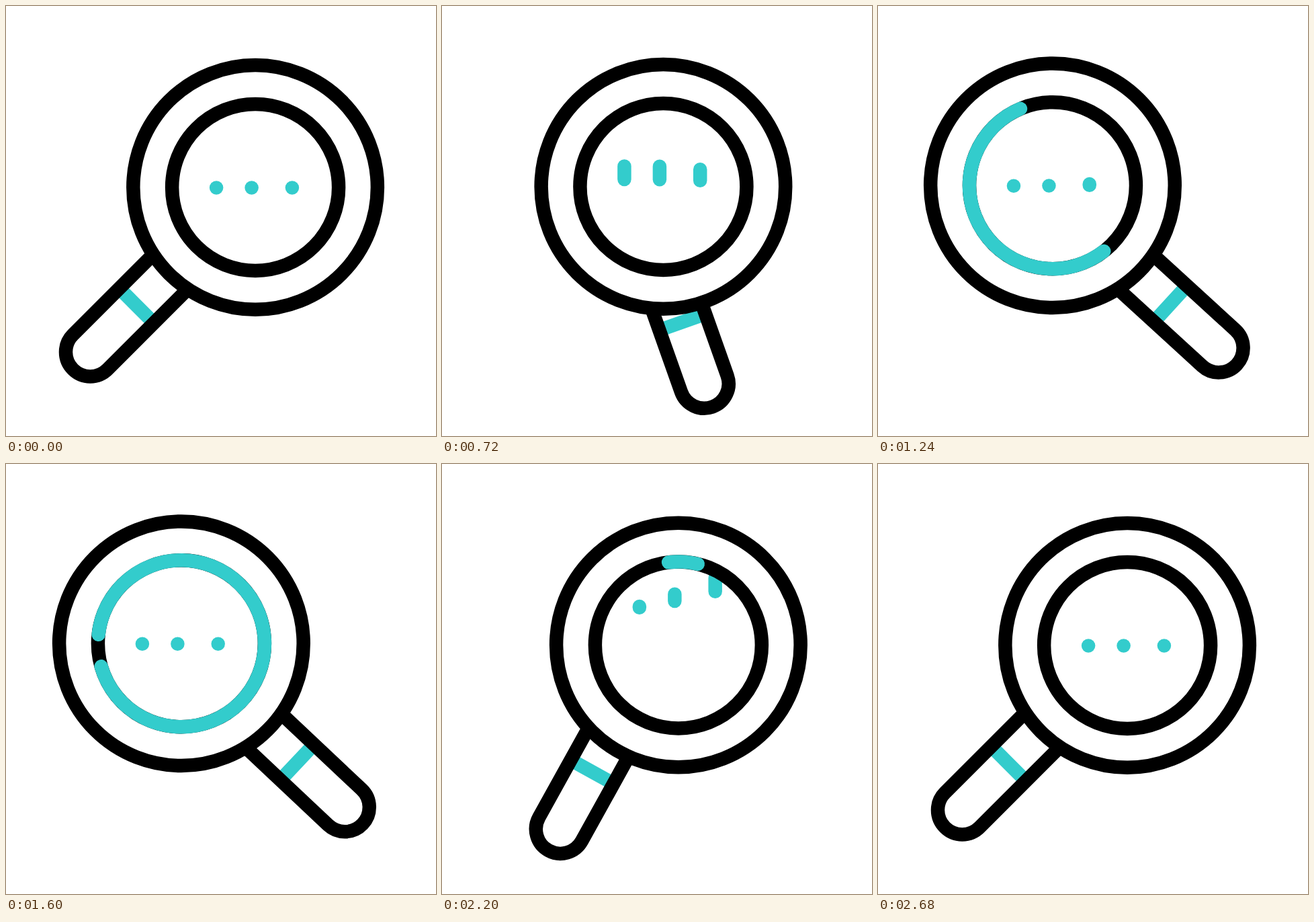
These frames come from a looping animation (640x640 px, 3000 ms). An HTML page:

```html
<!DOCTYPE html>
<html lang="en">
<head>
<meta charset="utf-8">
<title>Magnifier</title>
<style>
  html, body { margin: 0; width: 100%; height: 100%; overflow: hidden; background: #fff; }
  svg { display: block; width: 100vw; height: 100vh; }
  .ink { stroke: #000; }
  .hue { stroke: #3cc; }
</style>
</head>
<body>
<svg viewBox="0 0 640 640" fill="none" stroke-width="20.5">
  <defs><clipPath id="glass"><circle r="124"/></clipPath></defs>
  <g id="handle">
    <path class="hue" d="M72.5 -36V36"/>
    <path class="ink" d="M0 -36.4H170A36.4 36.4 0 0 1 170 36.4H0"/>
  </g>
  <g id="lens">
    <circle class="ink" r="181.8" fill="#fff"/>
    <g id="dots" class="hue" stroke-linecap="round" clip-path="url(#glass)">
      <path/><path/><path/>
    </g>
    <circle class="ink" r="124"/>
    <path id="arc" class="hue" stroke-linecap="round"/>
  </g>
</svg>
<script>
const LOOP = 3000, STEP = 40, R = 124;
const $ = id => document.getElementById(id);
const handle = $('handle'), lens = $('lens'), arc = $('arc');
const dots = [...$('dots').children];
const clamp = (v, lo, hi) => Math.min(hi, Math.max(lo, v));
const mix = (a, b, p) => a + (b - a) * p;

// Progress from a to b, eased by cubic-bezier(x1, 0, x2, 1)
function ease(t, a, b, x1 = 1 / 3, x2 = 1 - x1) {
  const x = clamp((t - a) / (b - a), 0, 1);
  if (x === 0 || x === 1) return x;
  let lo = 0, hi = 1;
  for (let i = 0; i < 24; i++) {
    const s = (lo + hi) / 2, r = 1 - s;
    if (3 * x1 * s * r * r + 3 * x2 * s * s * r + s * s * s < x) lo = s;
    else hi = s;
  }
  return lo * lo * (3 - 2 * lo);
}

// Swing out to the left, then back
const out = (t, x1, x2) => ease(t, 195, 1311, x1, x2);
const back = (t, x1, x2) => ease(t, 1440, 2680, x1, x2);

function drawTool(t) {
  const slide = out(t, .78) - back(t, .78);
  const turnOut = out(t, .76, .05);
  const turn = turnOut - back(t, .78);
  const shift = out(t, .67, .145) - back(t, .82, .03);
  const dip = 36 * turnOut * (1 - turnOut);
  const x = mix(245.6, 382, shift), y = mix(394.8, 394.2, shift) + dip;
  lens.setAttribute('transform',
    `translate(${mix(371.1, 259.7, slide)} ${mix(269.9, 267.2, slide)})`);
  handle.setAttribute('transform', `translate(${x} ${y}) rotate(${mix(135, 42.3, turn)})`);
}

const DOTS = [
  { x: -58, peak: 660, fall: 1680, rest: 2560 },
  { x: -5.5, peak: 790, fall: 1730, rest: 2602 },
  { x: 54.8, peak: 870, fall: 1813, rest: 2653 }
];

// Top and bottom of a dot's stroke, relative to the lens centre
function span(d, t) {
  if (t < d.fall) {
    const q = ease(t, d.peak - 450, d.peak, .6) - ease(t, d.peak, d.peak + 500, .6);
    return [-31.5 * q, -11.5 * q];
  }
  let mid = 82 * ((t - d.fall) / 240) ** 2.5, len = Math.min(20, mid * .35);
  if (mid > 140) {
    mid = Math.max(-140, -.00044 * Math.max(0, d.rest - t) ** 2);
    len = clamp((-mid - 54) * .6, 0, 20);
  }
  return [mid - len / 2, mid + len / 2];
}

function drawDots(t) {
  DOTS.forEach((d, i) => {
    const [top, end] = span(d, t);
    dots[i].setAttribute('d', `M${d.x} ${top + .5}V${end + .51}`);
  });
}

function point(deg) {
  const a = deg * Math.PI / 180;
  return `${(R * Math.cos(a)).toFixed(3)} ${(R * Math.sin(a)).toFixed(3)}`;
}

function drawArc(t) {
  const spin = -75 + 360 * ease(t, 555, 2265);
  const tail = spin + 360 * ease(t, 1480, 2400, .31, .44);
  const head = spin + 360 * ease(t, 837, 1600);
  const len = head - tail;
  if (len < .3) return arc.setAttribute('d', '');
  const mid = point(tail + len / 2);
  arc.setAttribute('d',
    `M${point(tail)}A${R} ${R} 0 0 1 ${mid}A${R} ${R} 0 0 1 ${point(head)}`);
}

function draw(now) {
  const t = Math.floor((now % LOOP) / STEP) * STEP;
  drawTool(t);
  drawDots(t);
  drawArc(t);
}

function tick() {
  draw(performance.now());
  requestAnimationFrame(tick);
}
tick();
</script>
</body>
</html>
```
